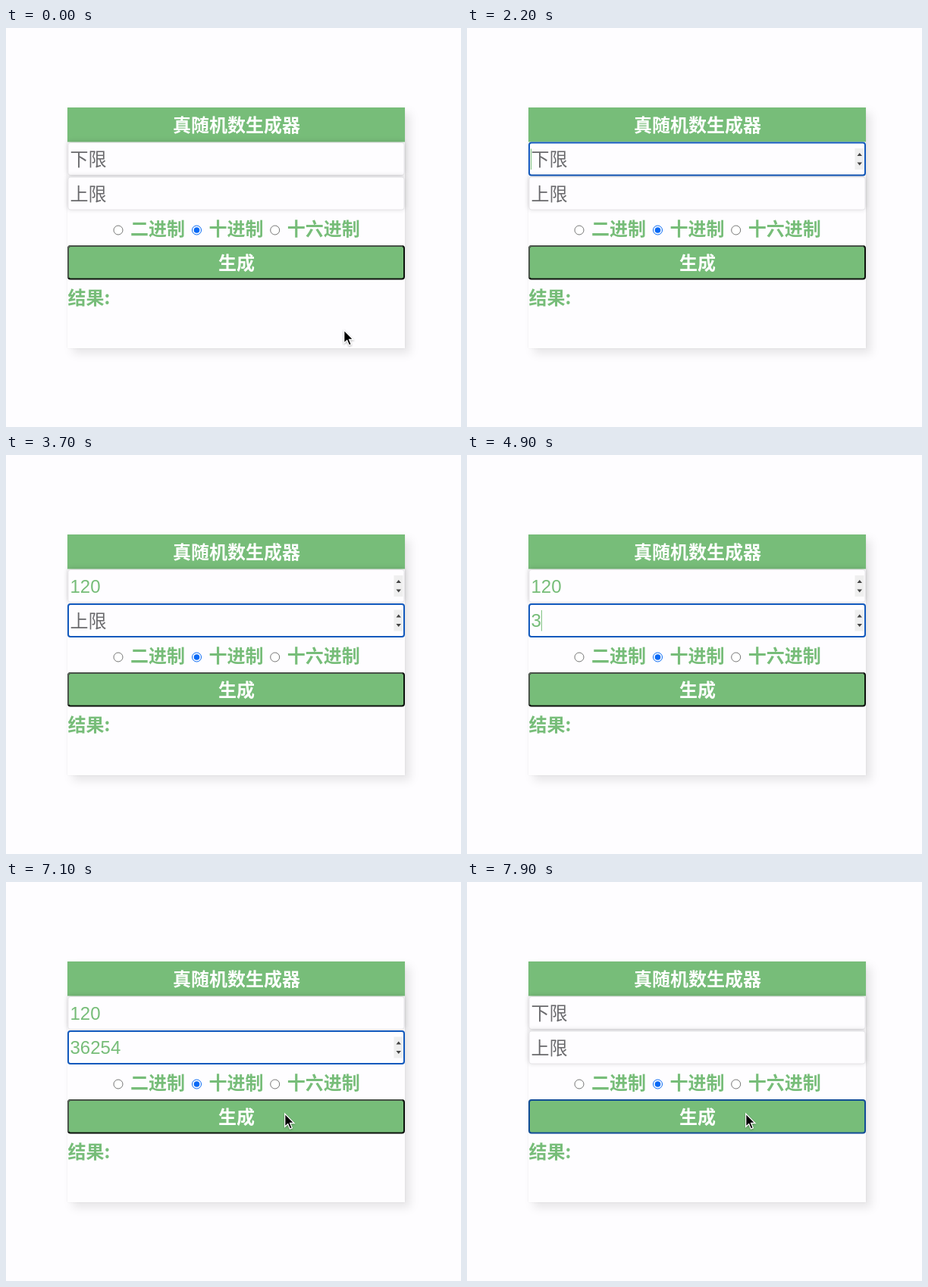
Write an HTML page that moves like this. It is 600 px wide and 527 px high and loops after 8 s.

```html
<!DOCTYPE html>
<html lang="zh-CN">
<head>
<meta charset="utf-8">
<title>真随机数生成器</title>
<style>
html, body { margin: 0; width: 100%; height: 100%; overflow: hidden; background: #fefdff; }
svg { display: block; width: 600px; height: 527px; }
text { font: 24px "Noto Sans CJK SC", "Noto Sans CJK", sans-serif; fill: #77bd79; }
.b { font-weight: 700; }
.w { fill: #fff; text-anchor: middle; }
.hint { fill: #6b6b6e; }
.num { font-family: "Liberation Sans", Arial, sans-serif; }
.card { fill: #fefdff; filter: drop-shadow(7px 7px 6px rgba(0,0,0,.09)) drop-shadow(0 0 1px rgba(0,0,0,.08)); }
.box { fill: #fefdff; stroke: #e6e5e8; filter: drop-shadow(0 -1px 3px rgba(0,0,0,.16)); }
.focus .box { stroke: #1259bd; stroke-width: 2; filter: none; }
.caret { stroke: #77bd79; }
.radio { fill: #fff; stroke: #767676; }
#arrow, #beam { filter: drop-shadow(0 1px 1px rgba(0,0,0,.3)); }
</style>
</head>
<body>
<svg viewBox="0 0 600 527">
  <rect class="card" x="81" y="105" width="445" height="318"/>
  <rect x="81" y="105" width="445" height="45.5" fill="#77bd79"/>
  <text class="b w" x="304" y="137">真随机数生成器</text>
  <g id="fields"></g>
  <g id="radios"></g>
  <g id="button">
    <rect id="face" x="82" y="288" width="443" height="43.5" rx="3" stroke-width="2"/>
    <path id="bevel" d="M82 330V291Q82 288 85 288H523" fill="none" stroke="#5c675c" stroke-width="1.6"/>
    <text class="b w" x="304" y="319">生成</text>
  </g>
  <text class="b" x="81.5" y="364.5">结果:</text>
  <path id="arrow" d="M.7 1V18.3L4.7 14.6 7.4 21 10.3 19.8 7.6 13.5H13Z" stroke="#fff" stroke-width="1.3"/>
  <g id="beam" fill="none">
    <path id="stem" d="M-4-12Q0-12 0-8.500Q0-12 4-12M0-9V9M-4 12Q0 12 0 8.500Q0 12 4 12M-2.500 4H2.500" stroke="#fff" stroke-width="3.400"/>
    <use href="#stem" id="ink"/>
    <path d="M-4-12Q0-12 0-8.500Q0-12 4-12M0-9V9M-4 12Q0 12 0 8.500Q0 12 4 12M-2.500 4H2.500" stroke="#000" stroke-width="1.500"/>
  </g>
</svg>
<script>
const $ = id => document.getElementById(id);
const LOOP = 8000, STEP = 100, DIGIT = 13.35;

$('fields').innerHTML = ['下限', '上限'].map((hint, i) => `
  <g transform="translate(0 ${i * 45.5})">
    <rect class="box" x="82" y="151.500" width="443" height="43" rx="3"/>
    <text class="hint" x="84.500" y="182">${hint}</text>
    <text class="num" x="84.500" y="181.500"></text>
    <path class="caret" d="M84.500 159.500V187"/>
    <g class="spin">
      <rect x="511.500" y="159" width="12" height="28" fill="#efefef"/>
      <path d="M514.500 169L517.700 165 521 169ZM514.500 177.500L517.700 181.500 521 177.500Z" fill="#444"/>
    </g>
  </g>`).join('');

$('radios').innerHTML = [[148, '二进制'], [251.5, '十进制'], [354.7, '十六进制']].map(([x, label], i) => `
  <circle class="radio" cx="${x}" cy="267" r="6" ${i == 1 ? 'style="stroke:#0869f5"' : ''}/>
  ${i == 1 ? `<circle cx="${x}" cy="267" r="3.800" fill="#0869f5"/>` : ''}
  <text class="b" x="${x + 16}" y="273.500">${label}</text>`).join('');

const fields = [...$('fields').children].map(g => ({
  g, hint: g.querySelector('.hint'), num: g.querySelector('.num'),
  caret: g.querySelector('.caret'), spin: g.querySelector('.spin')
}));

// Time of each keystroke
const typed = [
  { text: '120', keys: [2300, 2400, 2900] },
  { text: '36254', keys: [4900, 5000, 5200, 5400, 5600] }
];
// Mouse: time, x, y
const path = [[100, 445, 398], [900, 352, 175], [5800, 352, 175], [6300, 362, 279], [6700, 366, 303], [7100, 367, 305]];
// Caret: start of fading out, start of fading in
const blinks = [[1400, 1900], [3500, 3900], [4200, 4600], [6100, 6500], [6800, 7200]];

const show = (el, on) => el.style.display = on ? '' : 'none';
const clamp = v => Math.max(0, Math.min(1, v));
const ease = v => v * v * (3 - 2 * v);

function mouseAt(t) {
  let [, x, y] = path[0];
  for (let i = 1; i < path.length; i++) {
    const [t0, x0, y0] = path[i - 1], [t1, x1, y1] = path[i];
    if (t < t0) break;
    const k = ease(clamp((t - t0) / (t1 - t0)));
    x = x0 + (x1 - x0) * k;
    y = y0 + (y1 - y0) * k;
  }
  return [x, y];
}

function caretAt(t) {
  const blink = blinks.find(([out, back]) => t >= out && t < back + STEP);
  if (!blink) return 1;
  const [out, back] = blink;
  return t < back ? clamp(1 - (t - out + STEP) / 300) : (t - back + STEP) / 200;
}

function draw(t) {
  const [x, y] = mouseAt(t);
  const focus = t < 1000 ? -1 : t < 3200 ? 0 : t < 7300 ? 1 : -1;
  const cleared = t >= 7400;

  fields.forEach((f, i) => {
    const { text, keys } = typed[i];
    const value = cleared ? '' : text.slice(0, keys.filter(k => t >= k).length);
    const top = 150 + i * 45.5;
    f.g.classList.toggle('focus', focus == i);
    f.num.textContent = value;
    show(f.hint, !value);
    f.caret.style.opacity = focus == i ? caretAt(t) : 0;
    f.caret.setAttribute('transform', `translate(${value.length * DIGIT + (value ? .5 : 0)} 0)`);
    show(f.spin, focus == i || y >= top && y < top + 45.5);
  });

  const pressed = t >= 7300 && t < 7500, chosen = t >= 7300;
  $('button').setAttribute('transform', pressed ? 'translate(303.500 309.750) scale(.95) translate(-303.500 -309.750)' : '');
  $('face').setAttribute('fill', pressed ? '#2a6f86' : '#77bd79');
  $('face').setAttribute('stroke', pressed ? '#0f58c0' : chosen ? '#124d96' : '#0c120c');
  show($('bevel'), !chosen);

  const visible = t < 2000 || t >= 5900, beam = y < 287;
  show($('arrow'), visible && !beam);
  show($('beam'), visible && beam);
  $('arrow').setAttribute('transform', `translate(${x} ${y})`);
  $('beam').setAttribute('transform', `translate(${x} ${y})`);
}

const start = performance.now();
function tick() {
  const t = (performance.now() - start) % LOOP;
  draw(Math.floor(t / STEP) * STEP);
  requestAnimationFrame(tick);
}
tick();
</script>
</body>
</html>
```
